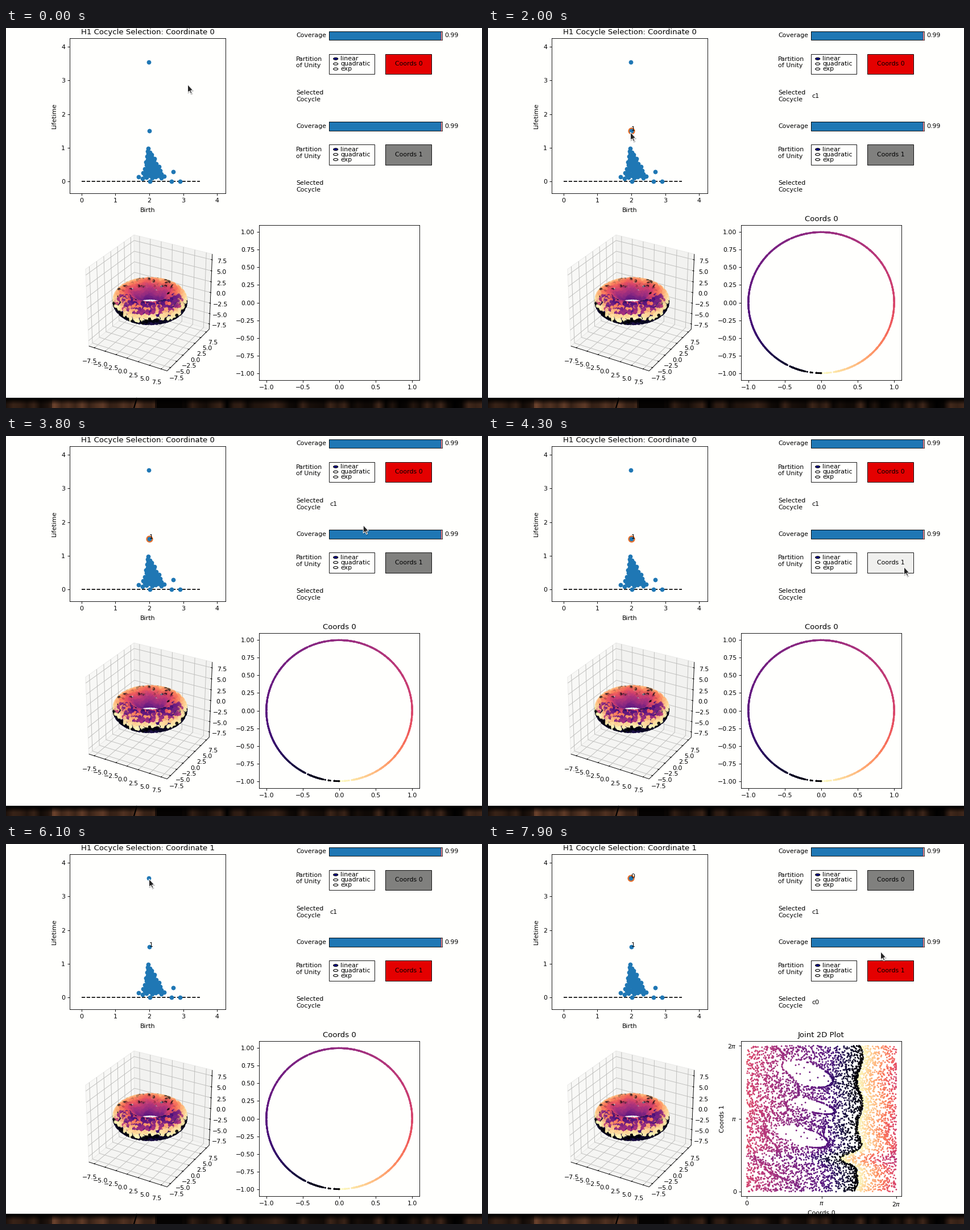
A matplotlib script that plays this animation: 837 by 669 pixels, repeating every 8 s.

```python
import numpy as np
import matplotlib
import matplotlib.pyplot as plt
from matplotlib.animation import FuncAnimation
from matplotlib.patches import Ellipse, Polygon, Rectangle

W, H, DPI, STEP, FRAMES = 837, 669, 80, 100, 80
BG, BLUE, ORANGE = "#fffffd", "#1f77b4", "#e8702a"
RED, GREY, HOVER = "#e40000", "#80807e", "#f0f0ee"
TAU = 2 * np.pi
plt.rcParams.update({
    "font.family": "DejaVu Sans", "font.size": 9.95, "axes.titlesize": 11.9,
    "axes.facecolor": BG, "figure.facecolor": BG,
})
magma = matplotlib.colormaps["magma"]
rng = np.random.default_rng(11)
fig = plt.figure(figsize=(W / DPI, H / DPI), dpi=DPI)


def pixel_axes(x0, y0, x1, y1, **kw):
    return fig.add_axes([x0 / W, 1 - y1 / H, (x1 - x0) / W, (y1 - y0) / H], **kw)


def layer(zorder):
    """Transparent full-stage axes measured in pixels from the top left."""
    ax = pixel_axes(0, 0, W, H, zorder=zorder)
    ax.axis("off")
    ax.set(xlim=(0, W), ylim=(H, 0))
    return ax


base, top = layer(0), layer(9)


def box(x0, y0, x1, y1, color, edge="black", lw=0.8):
    patch = Rectangle((x0, y0), x1 - x0, y1 - y0, fc=color, ec=edge, lw=lw)
    return base.add_patch(patch)


def label(x, y, text, ha="left"):
    return base.text(x, y, text, ha=ha, va="center")


# ---- controls ---------------------------------------------------------
def controls(index):
    dy = 159.5 * index
    box(568, 5.8 + dy, 766, 21.2 + dy, BLUE, "none", 0)
    box(568, 5.8 + dy, 767, 21.2 + dy, "none")
    base.plot([765.4] * 2, [6.5 + dy, 21 + dy], color="#c02030", lw=1)
    label(563.5, 13.5 + dy, "Coverage", "right")
    label(771.5, 13.5 + dy, "0.99")
    label(510, 60.5 + dy, "Partition\nof Unity")
    label(510, 119.8 + dy, "Selected\nCocycle")
    box(568, 45.8 + dy, 648, 81.2 + dy, BG)
    for k, name in enumerate(["linear", "quadratic", "exp"]):
        y = 54.2 + 9 * k + dy
        base.add_patch(Ellipse((579.7, y), 8, 3.8, ec="black", lw=1,
                               fc="#00009a" if k == 0 else BG))
        label(588, y, name)
    button = box(667, 45.8 + dy, 748, 81.2 + dy, GREY)
    label(708, 63 + dy, f"Coords {index}", "center")
    return button, label(569.5, 119.8 + dy, "")


(button0, chosen0), (button1, chosen1) = controls(0), controls(1)

# ---- persistence diagram ----------------------------------------------
pers = pixel_axes(112, 18, 386, 291)
X0, Y0, UX, UY = 132.5, 270.4, 59.7, 59.4
pers.set(xlim=((112 - X0) / UX, (386 - X0) / UX),
         ylim=((Y0 - 291) / UY, (Y0 - 18) / UY),
         xticks=range(5), yticks=range(5))
pers.set_xlabel("Birth", labelpad=6.3)
pers.set_ylabel("Lifetime", labelpad=6.3)
title = pers.set_title("H1 Cocycle Selection: Coordinate 0")
pers.plot([0, 3.5], [0, 0], "k--", lw=1.5)

TALL, MID = (1.985, 3.545), (2.0, 1.505)
outliers = [TALL, MID, (1.97, 0.99), (2.7, 0.3), (2.65, 0), (2.9, 0), (2.02, 0),
            (1.69, 0.14)]
# triangular cloud, widening towards short lifetimes
k = np.arange(48)
fall = ((k + 1) / 48) ** 0.7
births = 1.97 - 0.2 * fall + (0.04 + 0.7 * fall) * (k * 0.618 % 1)
cloud = np.column_stack([births, 0.95 - 0.86 * fall])


def ring(p):
    return pers.plot(*p, "o", color=ORANGE, ms=11, mew=0, zorder=2.5)[0]


ring_tall, ring_mid = ring(TALL), ring(MID)
pers.plot(*np.vstack([outliers, cloud]).T, "o", color=BLUE, ms=7, mew=0,
          zorder=3)
mark_tall = pers.text(*TALL, "0", zorder=5)
mark_mid = pers.text(*MID, "1", zorder=5)

# ---- torus in a perspective box ---------------------------------------
LIM, PANE = 8.44, 8.79
RIGHT = np.array([0.866, 0.5, 0])
UP = np.array([-0.25, 0.433, 0.866])
EYE = np.array([0.433, -0.75, 0.5])


def project(*xyz):
    p = np.stack(np.broadcast_arrays(*xyz)).astype(float) / (2 * LIM)
    d = 10 - np.tensordot(EYE, p, 1)
    return (253.2 + 1526 * np.tensordot(RIGHT, p, 1) / d,
            479.7 - 1483 * np.tensordot(UP, p, 1) / d)


def line3(points, color, z=2):
    base.plot(*project(*zip(*points)), color=color, lw=0.8, zorder=z,
              solid_capstyle="butt")


m, M = -PANE, PANE
panes = [
    ([(m, m, m), (m, M, m), (m, M, M), (m, m, M)], "#f8f8f6"),
    ([(m, M, m), (M, M, m), (M, M, M), (m, M, M)], "#f2f2f0"),
    ([(m, m, m), (M, m, m), (M, M, m), (m, M, m)], "#f5f5f3"),
]
for corners, color in panes:
    base.add_patch(Polygon(np.column_stack(project(*zip(*corners))), fc=color,
                           ec="#e8e8e6", lw=0.8, zorder=1))
t0, t1 = 0.28, 0.14
for v in np.arange(-7.5, 8, 2.5):
    for path in ([(v, m, m), (v, M, m), (v, M, M)],
                 [(M, v, m), (m, v, m), (m, v, M)],
                 [(m, m, v), (m, M, v), (M, M, v)]):
        line3(path, "#bcbcba")
    line3([(v, m + t0, m), (v, m - t1, m)], "black", 3)
    line3([(M - t0, v, m), (M + t1, v, m)], "black", 3)
    line3([(M - t0, M, v), (M + t1, M, v)], "black", 3)
    text = f"{v:.1f}".replace("-", "\u2212")
    for spot, dx, dy in (((v, m, m), -8.5, 24), ((M, v, m), 11.3, 19),
                         ((M, M, v), 17.7, 2.7)):
        x, y = project(*spot)
        label(x + dx, y + dy, text, "center")
line3([(m, m, m), (M, m, m), (M, M, m), (M, M, M)], "black", 3)

N = 3400
phi, th = rng.uniform(0, TAU, (2, N))
tx, ty = (5 + 2 * np.cos(th)) * np.array([np.cos(phi), np.sin(phi)])
tz = 2 * np.sin(th)
depth = EYE @ np.array([tx, ty, tz])
facing = np.cos(phi + np.pi / 3)
chance = rng.random(N)
hue = 1 - th / TAU - 0.12 * np.sin(th / 2) ** 2
hue += 0.03 * np.sin(5 * phi) - 0.05 * facing + rng.normal(0, 0.015, N)
# far-side points that show through the near skin
hue[(facing > 0.2) & (th > 0.4) & (th < 2) & (chance < 0.65)] -= 0.4
hue[(facing < 0.1) & (th > 0.8) & (th < 2.4) & (chance < 0.1)] = 0.03
rgba = magma(hue % 1)
rgba[:, 3] = 0.5 + 0.5 * (depth - depth.min()) / np.ptp(depth)
order = np.argsort(depth + rng.normal(0, 0.4, N))
base.scatter(*[c[order] for c in project(tx, ty, tz)], s=28, c=rgba[order],
             linewidths=0, zorder=4)


# ---- circular coordinates ---------------------------------------------
def shade(f):
    return magma(np.interp(f % 1, [0, 0.25, 0.5, 0.75, 0.875, 1],
                           [0, 0.28, 0.42, 0.58, 0.78, 1]))


PLOT = (445, 347, 727, 620)
circle = pixel_axes(*PLOT)
circle.set(xlim=(-1.1, 1.1), ylim=(-1.1, 1.1),
           xticks=np.arange(-1, 1.1, 0.5), yticks=np.arange(-1, 1.1, 0.25))
circle_title = circle.set_title("Coords 0")
f = rng.random(2200)
f = f[((f > 0.04) & (f < 0.97)) | (rng.random(f.size) < 0.3)]
ang = -np.pi / 2 - TAU * f
dots = circle.scatter(np.cos(ang), np.sin(ang), s=8, c=shade(f), linewidths=0,
                      zorder=3)

joint = pixel_axes(*PLOT)
joint.set(xlim=(445, 727), ylim=(620, 347), title="Joint 2D Plot",
          ylabel="Coords 1")
joint.set_xlabel("Coords 0", labelpad=5)
names = ["0", r"$\pi$", r"$2\pi$"]
joint.set_xticks([455, 586.5, 718], names)
joint.set_yticks([612, 483.5, 355], names)


def seam(y):
    dent = 36 * np.exp(-((y - 553) / 12) ** 2)
    foot = 14 * np.exp(-((y - 612) / 12) ** 2)
    return 655 + 5 * np.sin((y - 355) / 13) - dent - foot


def spread(n):
    return rng.uniform(455, 718, n), rng.uniform(355, 612, n)


def strand(n, x, y, dx, dy):
    """Wavy filament from (x, y) along (dx, dy)."""
    s = rng.random(n)
    return (x + dx * s + 6 * np.sin(9 * s) + rng.normal(0, 0.8, n),
            y + dy * s + rng.normal(0, 0.8, n))


px, py = spread(5600)
parts = []
for cx, cy, rx, ry in ((556, 404, 50, 21), (566, 460, 44, 11),
                       (552, 515, 46, 16)):
    # near-empty lens, slanting down to the right, with a crowded rim
    tilt = 0.25 * (px - cx)
    gap = ((px - cx) / rx) ** 2 + ((py - cy - tilt) / ry) ** 2 < 1
    keep = ~gap | (rng.random(px.size) < 0.07)
    px, py = px[keep], py[keep]
    a = rng.uniform(-1.5, 1.5, 90)
    parts.append((cx + rx * np.cos(a) + rng.normal(0, 1, 90),
                  cy + ry * np.sin(a) + 0.25 * rx * np.cos(a)))
parts += [(px, py), strand(90, 505, 355, 38, 78), strand(60, 545, 434, -28, 40),
          strand(80, 478, 470, 28, 75), strand(90, 455, 548, 90, 58),
          strand(60, 697, 490, 14, 55)]
for n, side, width in ((420, -1, 3), (260, 1, 7)):
    y = rng.uniform(355, 612, n)
    parts.append((seam(y) + side * np.abs(rng.normal(0, width, n)), y))
jx, jy = np.concatenate(parts, axis=1)
joint.scatter(jx, jy, s=6.6, c=shade((seam(jy) - jx) / 264), linewidths=0,
              zorder=1.5)

# ---- dark desktop strip and pointer -----------------------------------
cols = np.arange(W)
noise = np.interp(cols, np.linspace(0, W, 70), rng.random(70) ** 1.5)
lit = np.where((cols > 80) & (cols < 262), 0.2 + 0.25 * noise, 0.3 * noise)
lit[265:310] = 0.02
fade = np.clip(np.linspace(-0.1, 1.6, 18), 0, 1)
strip = (fade[:, None] * lit)[..., None] * np.array([1, 0.62, 0.42])
top.imshow(strip, extent=(0, W, H, 651.3), aspect="auto", zorder=1)
top.plot([230, 225], [652, H], color="black", lw=2, zorder=2)
top.set(xlim=(0, W), ylim=(H, 0))

ARROW = np.array([(0.5, 0.5), (0.5, 14.7), (3.7, 11.9), (5.9, 16.7),
                  (8.1, 15.8), (5.9, 11.1), (9.9, 10.7)])
shadow = top.add_patch(Polygon(ARROW, fc="black", ec="black", lw=1.5,
                               alpha=0.18, zorder=3))
pointer = top.add_patch(Polygon(ARROW, fc="#262626", ec="white", lw=0.9,
                                zorder=4))
START = (319, 99)
# start ms, end ms, goal x, goal y, sideways bow of the path
MOVES = [
    (0, 400, 250, 55, 0), (500, 900, 250, 183, 0), (2600, 2900, 297, 200, 0),
    (3000, 3200, 392, 210, 0), (3300, 4100, 731, 230, 73),
    (4400, 5400, 251, 61, 0), (6900, 7000, 268, 76, 0),
    (7100, 7300, 732, 370, 0), (7400, 7900, 690, 189, -42),
]


def pointer_at(t):
    pos = np.array(START, float)
    for begin, end, x, y, bow in MOVES:
        s = np.clip((t - begin) / (end - begin), 0, 1)
        d = np.array([x, y]) - pos
        normal = np.array([d[1], -d[0]]) / np.hypot(*d)
        pos = pos + d * s * s * (3 - 2 * s) + normal * bow * np.sin(np.pi * s)
        if s < 1:
            break
    return pos


def update(i):
    t = i * STEP
    tip = pointer_at(t)
    pointer.set_xy(ARROW + tip)
    shadow.set_xy(ARROW + tip + (0.6, 1.2))

    first, switched, second = t >= 2000, t >= 4500, t >= 6300
    title.set_text(f"H1 Cocycle Selection: Coordinate {int(switched)}")
    ring_mid.set_visible(first and not switched)
    mark_mid.set_visible(first)
    ring_tall.set_visible(second)
    mark_tall.set_visible(second)
    chosen0.set_text("c1" if first else "")
    chosen1.set_text("c0" if second else "")
    button0.set_facecolor(RED if t < 5000 else GREY)
    button1.set_facecolor(GREY if t < 4300 else HOVER if t < 5000 else RED)
    circle.set_visible(not second)
    dots.set_visible(first)
    circle_title.set_visible(first)
    joint.set_visible(second)
    return []


anim = FuncAnimation(fig, update, frames=FRAMES, interval=STEP, repeat=True,
                     repeat_delay=0, init_func=lambda: update(0))
plt.show()
```
